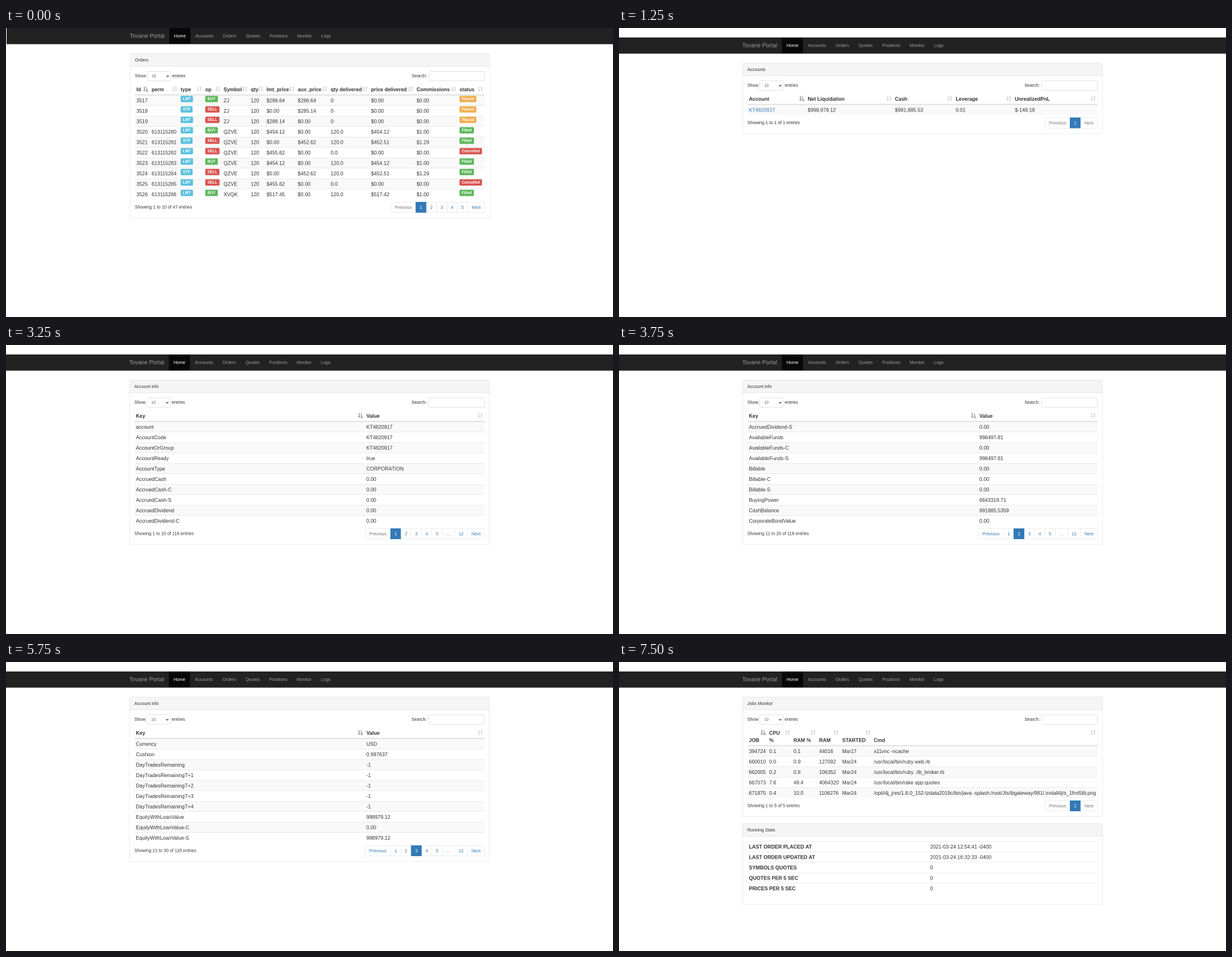
Write an HTML page with a canvas that moves like this. It is 960 by 457 pixels and loops after 8750 ms.

```html
<!DOCTYPE html>
<html lang="en">
<head>
<meta charset="utf-8">
<title>Trading dashboard</title>
<style>
html, body { margin: 0; width: 100%; height: 100%; overflow: hidden; background: #fff; }
canvas { display: block; width: 960px; height: 457px; }
</style>
</head>
<body>
<canvas id="stage" width="1920" height="914"></canvas>
<script>
// The page is laid out at 1920 x 914 and shown at half size.
const ctx = document.getElementById('stage').getContext('2d');
const FAMILY = '"Liberation Sans", Arial, sans-serif';
const LEFT = 406, RIGHT = 1514, ROW = 33, HOLD = 1250;
const TEXT = '#333', LINK = '#337ab7', MUTED = '#777', LINE = '#ddd';
const ACCOUNT = 'KT4820917';

const INFO = '#5bc0de', GOOD = '#5cb85c', BAD = '#d9534f', WARN = '#f0ad4e';
const BADGES = { LMT: INFO, STP: INFO, BUY: GOOD, Filled: GOOD, SELL: BAD, Cancelled: BAD, Placed: WARN };

const split = block => block.trim().split('\n').map(line => line.trim().split('|'));

const orders = split(`
  LMT|BUY|ZJ|120|$286.64|$286.64|0|$0.00|$0.00|Placed
  STP|SELL|ZJ|120|$0.00|$285.14|0|$0.00|$0.00|Placed
  LMT|SELL|ZJ|120|$288.14|$0.00|0|$0.00|$0.00|Placed
  LMT|BUY|QZVE|120|$454.12|$0.00|120.0|$454.12|$1.00|Filled
  STP|SELL|QZVE|120|$0.00|$452.62|120.0|$452.51|$1.29|Filled
  LMT|SELL|QZVE|120|$455.62|$0.00|0.0|$0.00|$0.00|Cancelled
  LMT|BUY|QZVE|120|$454.12|$0.00|120.0|$454.12|$1.00|Filled
  STP|SELL|QZVE|120|$0.00|$452.62|120.0|$452.51|$1.29|Filled
  LMT|SELL|QZVE|120|$455.62|$0.00|0.0|$0.00|$0.00|Cancelled
  LMT|BUY|XVQK|120|$517.45|$0.00|120.0|$517.42|$1.00|Filled
`).map((row, i) => [`${3517 + i}`, i < 3 ? '' : `${613115277 + i}`, ...row]);

const positions = split(`
  QZVE|0.0|$0.00|$451.72|$0.00|$-390.98
  XVQK|0.0|$0.00|$506.20|$0.00|$-397.90
  ZQTJ|120.0|$63.41|$62.15|$-152.19|$0.00
  QXWH|-2.0|$76.87|$77.05|$-0.34|$0.00
  ZXJ|-8.0|$26.83|$26.29|$4.36|$0.00
  YQKJ|0.0|$0.00|$235.80|$0.00|$-202.24
  XQJV|0.0|$0.00|$521.14|$0.00|$-198.76
  JZ|0.0|$0.00|$46.20|$0.00|$326.32
  QZK|0.0|$0.00|$21.96|$0.00|$-7.61
  ZQJ|0.0|$0.00|$36.97|$0.00|$-1.53
`).map(row => [ACCOUNT, ...row]);

const infoPage = (page, block) => ({
  title: 'Account info',
  heads: ['Key', 'Value'], xs: [411, 1140],
  rows: split(block),
  info: `Showing ${page * 10 - 9} to ${page * 10} of 118 entries`,
  pages: ['1', '2', '3', '4', '5', '…', '12'], page
});

const views = [
  {
    title: 'Orders',
    heads: ['Id', 'perm', 'type', 'op', 'Symbol', 'qty', 'lmt_price', 'aux_price',
      'qty delivered', 'price delivered', 'Commissions', 'status'],
    xs: [411, 459, 551, 629, 687, 773, 823, 922, 1026, 1154, 1298, 1434],
    rows: orders,
    info: 'Showing 1 to 10 of 47 entries',
    pages: ['1', '2', '3', '4', '5'], page: 1, scrolled: true
  },
  {
    title: 'Accounts',
    heads: ['Account', 'Net Liquidation', 'Cash', 'Leverage', 'UnrealizedPnL'],
    xs: [411, 597, 873, 1065, 1252],
    rows: [[ACCOUNT, '$998,979.12', '$991,885.53', '0.01', '$-148.18']],
    info: 'Showing 1 to 1 of 1 entries',
    pages: ['1'], page: 1, linked: true
  },
  infoPage(1, `
    account|${ACCOUNT}
    AccountCode|${ACCOUNT}
    AccountOrGroup|${ACCOUNT}
    AccountReady|true
    AccountType|CORPORATION
    AccruedCash|0.00
    AccruedCash-C|0.00
    AccruedCash-S|0.00
    AccruedDividend|0.00
    AccruedDividend-C|0.00`),
  infoPage(2, `
    AccruedDividend-S|0.00
    AvailableFunds|996497.81
    AvailableFunds-C|0.00
    AvailableFunds-S|996497.81
    Billable|0.00
    Billable-C|0.00
    Billable-S|0.00
    BuyingPower|6643318.71
    CashBalance|991885.5359
    CorporateBondValue|0.00`),
  infoPage(3, `
    Currency|USD
    Cushion|0.997637
    DayTradesRemaining|-1
    DayTradesRemainingT+1|-1
    DayTradesRemainingT+2|-1
    DayTradesRemainingT+3|-1
    DayTradesRemainingT+4|-1
    EquityWithLoanValue|998979.12
    EquityWithLoanValue-C|0.00
    EquityWithLoanValue-S|998979.12`),
  {
    title: 'Positions',
    heads: ['Account', 'Symbol', 'qty', 'Avg Cost', 'Market Price', 'Unrealized PNL', 'Realized PNL'],
    xs: [411, 559, 687, 766, 913, 1100, 1321],
    rows: positions,
    info: 'Showing 1 to 10 of 10 entries',
    pages: ['1'], page: 1
  },
  {
    title: 'Jobs Monitor',
    heads: ['JOB', 'CPU\n%', 'RAM %', 'RAM', 'STARTED', 'Cmd'],
    xs: [411, 475, 552, 633, 706, 806],
    rows: split(`
      394724|0.1|0.1|44016|Mar17|x11vnc -ncache
      660010|0.0|0.9|127092|Mar24|/usr/local/bin/ruby web.rb
      662005|0.2|0.8|106352|Mar24|/usr/local/bin/ruby ./ib_broker.rb
      667073|7.6|49.4|4064320|Mar24|/usr/local/bin/rake app:quotes
      671875|0.4|10.0|1106276|Mar24|/opt/i4j_jres/1.8.0_152-tzdata2019c/bin/java -splash:/root/Jts/ibgateway/981/.install4j/s_1fmt56t.png`),
    info: 'Showing 1 to 5 of 5 entries',
    pages: ['1'], page: 1,
    stats: split(`
      LAST ORDER PLACED AT|2021-03-24 12:54:41 -0400
      LAST ORDER UPDATED AT|2021-03-24 16:32:33 -0400
      SYMBOLS QUOTES|0
      QUOTES PER 5 SEC|0
      PRICES PER 5 SEC|0`)
  }
];

function setFont(size, bold) {
  ctx.font = `${bold ? 'bold ' : ''}${size}px ${FAMILY}`;
}

function text(str, x, y, size = 14, color = TEXT, bold = false) {
  setFont(size, bold);
  ctx.fillStyle = color;
  ctx.fillText(str, x, y);
}

function width(str, size = 14, bold = false) {
  setFont(size, bold);
  return ctx.measureText(str).width;
}

function rect(x, y, w, h, color) {
  ctx.fillStyle = color;
  ctx.fillRect(x, y, w, h);
}

function box(x, y, w, h, radius, fill, stroke) {
  const inset = stroke ? 0.5 : 0;
  ctx.beginPath();
  ctx.roundRect(x + inset, y + inset, w - 2 * inset, h - 2 * inset, radius);
  ctx.fillStyle = fill;
  ctx.fill();
  if (stroke) {
    ctx.strokeStyle = stroke;
    ctx.lineWidth = 1;
    ctx.stroke();
  }
}

function polygon(...points) {
  ctx.beginPath();
  points.forEach(([x, y]) => ctx.lineTo(x, y));
  ctx.fill();
}

function navbar() {
  rect(0, 30, 1920, 51, '#222');
  rect(0, 80, 1920, 1, '#080808');
  text('Tovane Portal', 390, 61, 18, '#9d9d9d');
  let x = 515;
  for (const name of ['Home', 'Accounts', 'Orders', 'Quotes', 'Positions', 'Monitor', 'Logs']) {
    const w = width(name) + 30, active = name === 'Home';
    if (active) rect(x, 30, Math.round(w), 50, '#080808');
    text(name, x + 15, 60, 14, active ? '#fff' : '#9d9d9d');
    x += w;
  }
}

function panel(title, top, bottom) {
  box(390, top, 1140, bottom - top, 4, '#fff', LINE);
  box(391, top + 1, 1138, 41, [3, 3, 0, 0], '#f5f5f5');
  rect(391, top + 41, 1138, 1, LINE);
  text(title, LEFT, top + 26);
}

function controls() {
  text('Show', LEFT, 186);
  box(445, 167, 75, 30, 3, '#fff', '#ccc');
  text('10', 460, 186, 12, '#555');
  ctx.beginPath();
  [[506.5, 180.5], [510, 184], [513.5, 180.5]].forEach(([x, y]) => ctx.lineTo(x, y));
  ctx.strokeStyle = TEXT;
  ctx.lineWidth = 2;
  ctx.stroke();
  text('entries', 524, 186);
  text('Search:', 1282.5, 186);
  box(1337, 167, 177, 30, 3, '#fff', '#ccc');
}

function sortIcon(x, y, sorted) {
  ctx.save();
  ctx.translate(x, y);
  ctx.globalAlpha = sorted ? 0.5 : 0.2;
  ctx.fillStyle = TEXT;
  const arrow = () => polygon([-5.5, -8], [-2.5, -8], [-2.5, 3], [0, 3], [-4, 8], [-8, 3], [-5.5, 3]);
  arrow();
  if (sorted) {
    for (let i = 0; i < 4; i++) ctx.fillRect(1, -8 + i * 4.3, 2 + i * 1.8, 3);
  } else {
    ctx.rotate(Math.PI);
    arrow();
  }
  ctx.restore();
}

function badge(label, x, baseline) {
  box(x, baseline - 13.5, width(label, 12, true) + 14.4, 20, 3, BADGES[label]);
  text(label, x + 7.2, baseline, 12, '#fff', true);
}

function table({ heads, xs, rows, linked }, top) {
  heads.forEach((head, i) => {
    const lines = head.split('\n');
    lines.forEach((line, n) =>
      text(line, xs[i], top - 12 - 23 * (lines.length - 1 - n), 16, TEXT, true));
    const edge = i + 1 < xs.length ? xs[i + 1] - 5 : RIGHT;
    sortIcon(edge - 14, 223, i === 0);
  });
  rect(LEFT, top - 2, RIGHT - LEFT, 2, LINE);
  rows.forEach((row, r) => {
    const y = top + r * ROW;
    if (r % 2 === 0) rect(LEFT, y, RIGHT - LEFT, ROW, '#f9f9f9');
    rect(LEFT, y, RIGHT - LEFT, 1, LINE);
    row.forEach((cell, i) => {
      if (BADGES[cell]) badge(cell, xs[i], y + 16);
      else text(cell, xs[i], y + 23, 16, linked && i === 0 ? LINK : TEXT);
    });
  });
}

function pagination({ pages, page }, y) {
  const items = ['Previous', ...pages, 'Next'];
  const widths = items.map(item => width(item) + 25);
  let x = RIGHT - 1 - widths.reduce((a, b) => a + b);
  items.forEach((item, i) => {
    const active = i === page;
    const disabled = item === '…' || (i === 0 && page === 1) ||
      (item === 'Next' && pages.length === 1);
    const radius = i === 0 ? [4, 0, 0, 4] : item === 'Next' ? [0, 4, 4, 0] : 0;
    const left = Math.round(x), right = Math.round(x + widths[i]) + 1;
    // The border of the active item stays on top of the next one.
    const shift = i === page + 1 ? 1 : 0;
    box(left, y, right - left, 34, radius, active ? LINK : '#fff', active ? LINK : LINE);
    if (shift) rect(left, y, 1, 34, LINK);
    text(item, x + 13, y + 22, 14, active ? '#fff' : disabled ? MUTED : LINK);
    x += widths[i];
  });
}

function statsPanel(stats) {
  panel('Running Stats', 510, 768);
  stats.forEach(([name, value], i) => {
    const y = 567 + i * ROW;
    rect(LEFT, y, RIGHT - LEFT, 1, LINE);
    text(name, 411, y + 23, 16, TEXT, true);
    text(value, 984, y + 23, 16);
  });
}

function draw(view) {
  ctx.setTransform(1, 0, 0, 1, 0, 0);
  rect(0, 0, 1920, 914, '#fff');
  if (view.scrolled) ctx.setTransform(959 / 960, 0, 0, 1, 2, -30);
  const wrapped = view.heads.some(head => head.includes('\n'));
  const top = wrapped ? 265 : 242;
  const end = top + view.rows.length * ROW;
  navbar();
  panel(view.title, 110, end + 60);
  controls();
  table(view, top);
  text(view.info, LEFT, end + 29);
  pagination(view, end + 8);
  if (view.stats) statsPanel(view.stats);
}

let shown = -1;
function tick() {
  const index = Math.floor(performance.now() / HOLD) % views.length;
  if (index !== shown) draw(views[shown = index]);
  requestAnimationFrame(tick);
}
tick();
</script>
</body>
</html>
```
